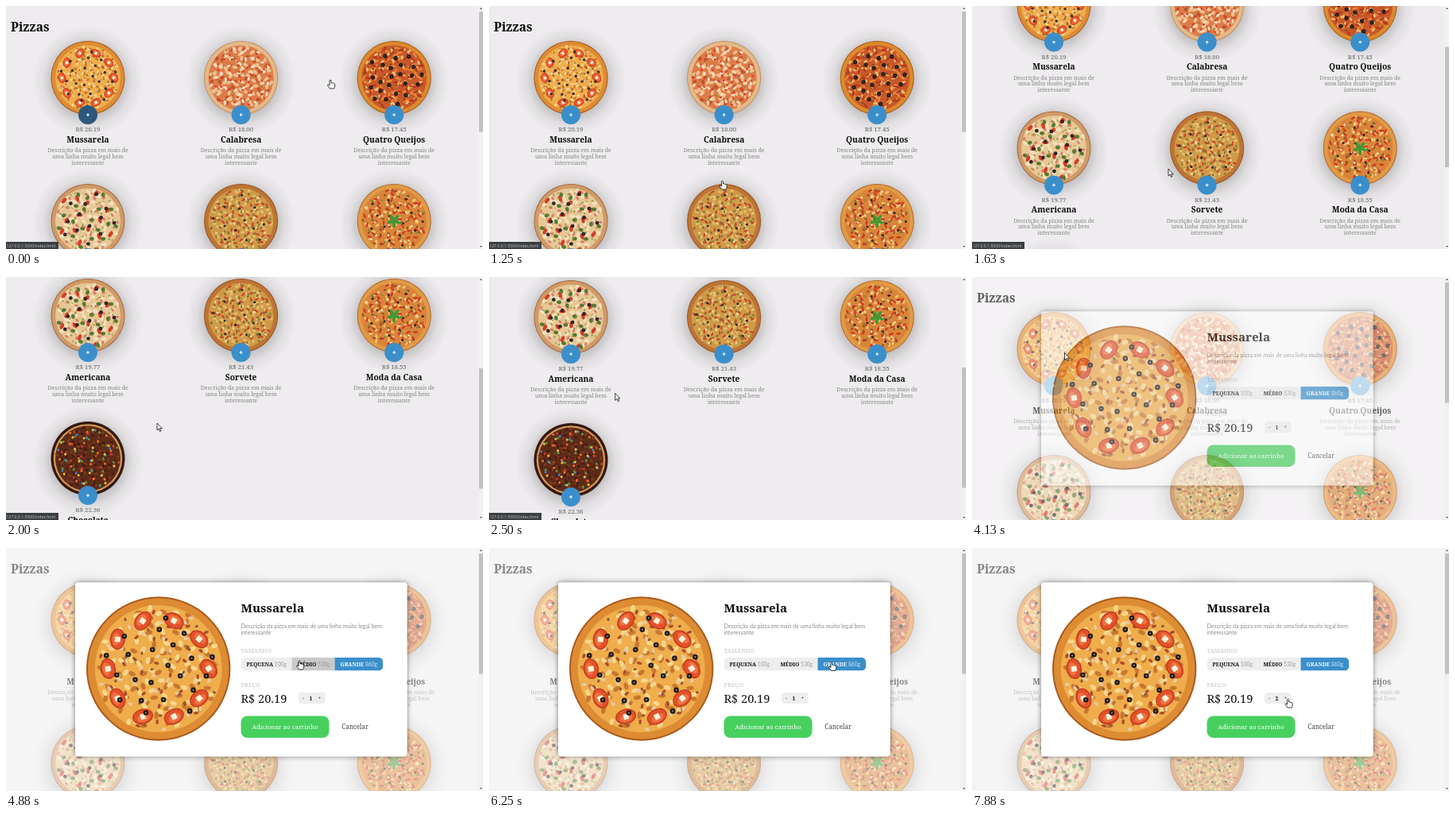
Animation of 600 by 306 pixels, one loop 8000 ms. Source, as an HTML page:

```html
<!DOCTYPE html>
<html lang="pt-BR">
<head>
<meta charset="utf-8">
<title>Pizzas</title>
<style>
  html, body { margin: 0; width: 100%; height: 100%; overflow: hidden; background: #eeecee; }
  svg { display: block; width: 600px; height: 306px; }
  text { font-family: "Noto Serif", serif; }
  .bold { font-weight: 700; }
  .lato { font-family: Lato, sans-serif; font-weight: 400; }
  .mid { text-anchor: middle; }
</style>
</head>
<body>
<svg id="stage" viewBox="0 0 600 306" xmlns="http://www.w3.org/2000/svg"></svg>
<script>
const LOOP = 8000, STEP = 125;
const BLUE = [58, 143, 203], DARK_BLUE = [43, 88, 125];
const INK = '#0c0c0c', GREY = '#858585';

function seeded(seed) {
  return () => {
    seed = (seed * 1664525 + 1013904223) >>> 0;
    return seed / 4294967296;
  };
}

const circle = (x, y, r, fill, extra = '') =>
  `<circle cx="${x}" cy="${y}" r="${r}" fill="${fill}" ${extra}/>`;
const rect = (x, y, w, h, fill, extra = '') =>
  `<rect x="${x}" y="${y}" width="${w}" height="${h}" fill="${fill}" ${extra}/>`;
const text = (x, y, size, fill, str, extra = '') =>
  `<text x="${x}" y="${y}" font-size="${size}" fill="${fill}" ${extra}>${str}</text>`;

// Toppings: [colour, count, rx, ry, kind]
const pizzas = [
  { name: 'Mussarela', price: '20.19', crust: ['#a9591c', '#dd8c33', '#efad4c'], bits: [
    ['#c8772f', 60, 2.4, 1.4], ['#f7d78c', 75, 2.2, 1.4], ['#a94e2c', 34, 1.6, 0.9],
    ['#e9c9a0', 40, 1.6, 1], ['#8c5a36', 26, 1.1, 0.8]], tomatoes: 10,
    olives: [22, 1.7, '#9a7a5a'] },
  { name: 'Calabresa', price: '18.00', crust: ['#c58f5f', '#e3b98a', '#dd7c48'], bits: [
    ['#c94f2c', 50, 3, 2], ['#f0c08e', 70, 3.2, 2], ['#f6dcc0', 48, 2.8, 1.6],
    ['#d8402c', 34, 1.8, 1.2], ['#77813c', 24, 1.3, 0.8]] },
  { name: 'Quatro Queijos', price: '17.45', crust: ['#a9591c', '#dc8a2c', '#c8582a'], bits: [
    ['#e88a38', 55, 4, 1.3], ['#f0bd72', 45, 2.8, 1.4], ['#b3351f', 40, 3.6, 1.2],
    ['#8a4a22', 30, 2, 1], ['#d9d08a', 18, 1.6, 1]], olives: [24, 2.6, '#5a3a2a'] },
  { name: 'Americana', price: '19.77', crust: ['#a46a43', '#d09a66', '#e6c795'], bits: [
    ['#f3e0bd', 60, 3.4, 2.2], ['#d9806a', 34, 2.6, 1.6], ['#d23b28', 15, 4, 2.2],
    ['#c79a5c', 30, 1.8, 1], ['#557a32', 20, 3, 2.3], ['#7c9c4a', 20, 1.4, 1]],
    olives: [13, 2.3, '#5b4a52'] },
  { name: 'Sorvete', price: '21.43', crust: ['#99531f', '#bd7434', '#cf9a48'], bits: [
    ['#e2bd6c', 70, 2.6, 1.6], ['#c8452a', 50, 2.8, 1.2], ['#8a6a30', 45, 2, 1.3],
    ['#f1d9a0', 30, 1.8, 1.1], ['#6d7c33', 24, 1.8, 1]], olives: [13, 1.5, '#6a5030'] },
  { name: 'Moda da Casa', price: '18.55', crust: ['#b5662a', '#e09a46', '#d8843a'], bits: [
    ['#f0c06a', 60, 2.8, 1.6], ['#cf3a22', 52, 3.2, 1.3], ['#8d5426', 40, 2, 1.2],
    ['#f5dfae', 26, 1.8, 1.1], ['#7a8a38', 16, 1.8, 1]], olives: [15, 1.5, '#6a5030'], leaf: true },
  { name: 'Chocolate', price: '22.36', crust: ['#35170f', '#d19a55', '#5c2a18'], rim: 3.2, bits: [
    ['#7b3a20', 70, 2.6, 1.5], ['#3f1a10', 60, 2.2, 1.2], ['#d8392c', 18, 1.5, 1.5],
    ['#3d86c8', 18, 1.5, 1.5], ['#f0c23a', 18, 1.5, 1.5], ['#5a9a42', 18, 1.5, 1.5],
    ['#e8762c', 18, 1.5, 1.5]] },
];

function scatter(n, reach, rand, draw) {
  const turn = rand() * 6.28;
  let out = '';
  for (let i = 0; i < n; i++) {
    const a = i * 2.39996 + turn + rand() * 0.4;
    const r = reach * Math.sqrt((i + 0.2 + rand() * 0.8) / n);
    out += draw((r * Math.cos(a)).toFixed(1), (r * Math.sin(a)).toFixed(1));
  }
  return out;
}

function tomatoRing(n) {
  let out = '';
  for (let i = 0; i < n; i++) {
    const deg = -108 + i * 360 / n;
    out += `<g transform="rotate(${deg}) translate(32.5 0) rotate(${i * 47 % 70 - 35})">
      <ellipse rx="4.6" ry="6.4" fill="#e4512b" stroke="#c03a1b" stroke-width=".7"/>
      <ellipse cx="1" rx="2.4" ry="4.2" fill="#ee7440"/>
      ${rect(-1.8, -1.8, 3.6, 3.4, '#fbf2da')}</g>`;
  }
  return out;
}

function pizzaArt(p, index) {
  const rand = seeded(index * 977 + 31);
  const rim = p.rim || 1;
  let out = circle(0, 0, 46.5, p.crust[0]) + circle(0, 0, 46.5 - rim, p.crust[1]) +
    circle(0, 0, 41, p.crust[2]);
  for (const [fill, n, rx, ry] of p.bits) {
    out += scatter(n, 39.5, rand, (x, y) =>
      `<ellipse rx="${rx}" ry="${ry}" fill="${fill}" transform="translate(${x} ${y}) rotate(${Math.round(rand() * 180)})"/>`);
  }
  if (p.tomatoes) out += tomatoRing(p.tomatoes);
  if (p.olives) {
    const [n, r, hole] = p.olives;
    out += scatter(n, 36, rand, (x, y) => circle(x, y, r, '#1d1a1c') + circle(x, y, r * 0.35, hole));
  }
  if (p.leaf) {
    for (let i = 0; i < 5; i++) {
      out += `<ellipse cx="4.5" rx="4.5" ry="2" fill="#3f9a34" transform="rotate(${i * 72 + 20})"/>`;
    }
  }
  return `<g id="pizza${index}">${out}</g>`;
}

const plus = (x, y) =>
  `<path d="M${x - 2} ${y}h4M${x} ${y - 2}v4" stroke="#fff" stroke-width="1"/>`;

function card(p, i) {
  const x = 103 + (i % 3) * 192.6, y = Math.floor(i / 3) * 180;
  const lines = ['Descrição da pizza em mais de', 'uma linha muito legal bem', 'interessante'];
  return `<g transform="translate(${x} ${y})">
    ${circle(0, 94, 70, 'url(#glow)')}
    <use href="#pizza${i}" y="90.5"/>
    ${circle(0, 137, 12, `rgb(${BLUE})`, `id="add${i}"`)}${plus(0, 137)}
    ${text(0, 158, 7.8, '#666', 'R$ ' + p.price, 'class="mid"')}
    ${text(0, 171.5, 10.2, INK, p.name, 'class="mid bold"')}
    ${lines.map((s, k) => text(0, 184.3 + k * 7.6, 7, GREY, s, 'class="mid"')).join('')}
  </g>`;
}

const sizes = [
  { x: 295.5, w: 64, tx: 302.5, label: 'PEQUENA', weight: '100g' },
  { x: 359.5, w: 54, tx: 366.5, label: 'MÉDIO', weight: '530g' },
  { x: 413.5, w: 60.5, tx: 420.5, label: 'GRANDE', weight: '860g' },
];

const sizeCell = (s, i) => rect(s.x, 138, s.w, 16.5, '#eee', `id="cell${i}"`) +
  `<text id="label${i}" x="${s.tx}" y="148.6" font-size="6.7" class="bold">${s.label}
   <tspan id="weight${i}" class="lato">${s.weight}</tspan></text>`;

const modal = `<g id="modal">
  ${rect(0, 0, 594, 306, '#fff', 'fill-opacity=".5"')}
  ${rect(87, 43.5, 417.5, 219, '#fff', 'rx="4" filter="url(#shade)"')}
  <use href="#pizza0" transform="translate(191.7 152) scale(1.95)"/>
  ${text(295.5, 81, 15.2, INK, 'Mussarela', 'class="bold"')}
  ${text(295.5, 101, 7.1, '#8b8b8b', 'Descrição da pizza em mais de uma linha muito legal bem', 'class="lato"')}
  ${text(295.5, 109, 7.1, '#8b8b8b', 'interessante', 'class="lato"')}
  ${text(295.5, 131.5, 7.4, '#c6c6c6', 'TAMANHO')}
  <g clip-path="url(#pill)">${sizes.map(sizeCell).join('')}</g>
  ${text(295.5, 174.5, 7.5, '#c6c6c6', 'PREÇO')}
  ${text(295.5, 194.5, 14.6, '#111', 'R$ 20.19')}
  ${rect(368, 182, 33.5, 14, '#eee', 'rx="3.5"')}
  ${text(374, 191.3, 7, '#333', '-', 'class="mid"')}
  ${text(383.5, 191.5, 6.8, '#111', '1', 'class="mid bold" id="count"')}
  ${text(394.3, 191.3, 7, '#333', '+', 'class="mid"')}
  ${rect(295.5, 211.5, 111, 27.5, '#48d05f', 'rx="8"')}
  ${text(351, 228, 7.9, '#fff', 'Adicionar ao carrinho', 'class="mid"')}
  ${text(439, 228, 8, '#444', 'Cancelar', 'class="mid"')}
</g>`;

const pointer = `<g id="cursor" stroke="#111" stroke-width=".8" stroke-linejoin="round" fill="#fff">
  <path id="arrow" d="M0 0V9L2.1 7.1L3.6 10.4L5 9.8L3.5 6.6H6.2Z"/>
  <path id="hand" d="M-1 .8Q0-.6 1 .8V4Q2 3.3 2.7 4.3Q3.7 3.7 4.3 4.8Q5.4 4.4 5.6 5.6V8Q5.4 9.6 4.5 11H-.6Q-1.7 9-3.4 7.2Q-3.9 5.7-2.3 6L-1 7Z"/>
</g>`;

const stage = document.getElementById('stage');
stage.innerHTML = `<defs>
    <radialGradient id="glow">
      <stop offset=".6" stop-opacity=".2"/><stop offset=".8" stop-opacity=".06"/>
      <stop offset="1" stop-opacity="0"/>
    </radialGradient>
    <filter id="shade" x="-10%" y="-10%" width="120%" height="120%">
      <feDropShadow dx="0" dy="0" stdDeviation="3.2" flood-color="#000" flood-opacity=".5"/>
    </filter>
    <clipPath id="pill">${rect(295.5, 138, 178.5, 16.5, '#000', 'rx="5"')}</clipPath>
    ${pizzas.map(pizzaArt).join('')}
  </defs>
  ${rect(0, 0, 600, 306, '#eeecee')}
  <g id="page">${text(6, 31.5, 15.5, INK, 'Pizzas', 'class="bold"')}${pizzas.map(card).join('')}</g>
  ${modal}
  ${rect(594, 0, 6, 306, '#f1f1f1')}
  ${rect(595, 7, 5, 151.5, '#c1c1c1', 'id="thumb"')}
  <path d="M596 4l1.5-2 1.5 2zM596 302l1.5 2 1.5-2z" fill="#555"/>
  <g id="status">${rect(0, 297, 66, 9, '#3c3f42')}
    ${text(0.5, 303.6, 5.1, '#c4c6c8', '127.0.0.1:5500/index.html', 'style="font-family:\'Open Sans\',sans-serif"')}</g>
  ${pointer}`;

const el = id => document.getElementById(id);
const set = (id, key, value) => el(id).setAttribute(key, value);

// Interpolates keys of the form [time, value, ...]
function track(keys, t) {
  let i = 0;
  while (i < keys.length - 1 && keys[i + 1][0] <= t) i++;
  const a = keys[i], b = keys[i + 1] || a;
  const k = a === b ? 0 : (t - a[0]) / (b[0] - a[0]);
  return a.slice(1).map((v, n) => v + (b[n + 1] - v) * k);
}

const scrollKeys = [[0, 0], [1250, 0], [1375, 12], [1500, 48], [2000, 222], [2250, 278],
  [2375, 270], [2500, 220], [2750, 70], [2875, 16], [3000, 0]];
const hoverKeys = [[0, 1], [250, 1], [375, 0], [2875, 0], [3125, 1], [3875, 1], [4125, 0]];
const fadeKeys = [[0, 0], [3875, 0], [4000, .2], [4125, .68], [4250, .9], [4375, .98], [4500, 1]];
const cursorKeys = [[0, 408, 93], [250, 408, 93], [375, 400, 101], [500, 400, 101], [1250, 293.5, 220],
  [1375, 285, 219], [2000, 190, 184], [2375, 168, 160], [3125, 112, 78], [3375, 112, 78],
  [4125, 116.5, 95.5], [4375, 160, 108], [4875, 369, 142], [5125, 369, 142], [5375, 325, 142],
  [5750, 325, 142], [6125, 432, 143], [6375, 430, 144], [6625, 402, 178], [6750, 399, 185],
  [6875, 398, 189], [7000, 397, 188], [7375, 397, 188], [7875, 397.5, 190]];

function render(t) {
  const [scroll] = track(scrollKeys, t);
  const [hover] = track(hoverKeys, t);
  const [fade] = track(fadeKeys, t);
  const [cx, cy] = track(cursorKeys, t);

  set('page', 'transform', `translate(0 ${-scroll})`);
  set('thumb', 'y', 7 + scroll * 108 / 222);
  set('add0', 'fill', `rgb(${BLUE.map((v, i) => Math.round(v + (DARK_BLUE[i] - v) * hover))})`);
  set('modal', 'opacity', fade);
  set('status', 'visibility', t < 4000 ? 'visible' : 'hidden');

  const chosen = t >= 5125 && t < 5500 ? 1 : t >= 5500 && t < 6250 ? 0 : 2;
  const onSizes = t >= 4500 && cy > 138 && cy < 154.5;
  sizes.forEach((s, i) => {
    const over = onSizes && cx >= s.x && cx < s.x + s.w;
    const on = i === chosen;
    set('cell' + i, 'fill', on ? `rgb(${BLUE})` : over ? '#c9c9c9' : '#eee');
    set('label' + i, 'fill', on ? '#fff' : '#111');
    set('weight' + i, 'fill', on ? '#d3e6f3' : '#999');
  });
  el('count').textContent = t >= 7500 ? '2' : '1';

  const isArrow = (t >= 1500 && t < 2875) || (t >= 4000 && t < 4750);
  set('arrow', 'visibility', isArrow ? 'visible' : 'hidden');
  set('hand', 'visibility', isArrow ? 'hidden' : 'visible');
  set('cursor', 'transform', `translate(${cx} ${cy})`);
}

const start = performance.now();
function tick() {
  const t = (performance.now() - start) % LOOP;
  render(Math.floor(t / STEP) * STEP);
  requestAnimationFrame(tick);
}
tick();
</script>
</body>
</html>
```
